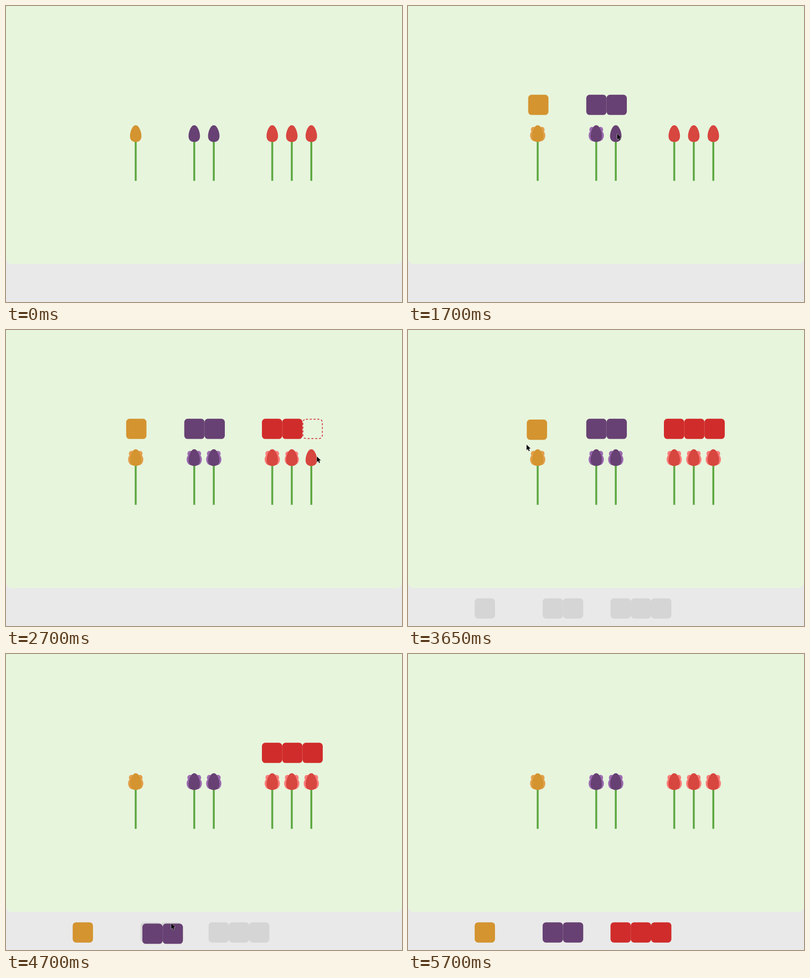
Recreate the animation shown at these times as an HTML page. Size 865 px wide and 648 px high, loop 5.75 s.

```html
<!DOCTYPE html>
<html lang="en">
<head>
<meta charset="utf-8">
<title>Tulips</title>
<style>
html, body { margin: 0; width: 100%; height: 100%; overflow: hidden; background: #e9e9e9; }
svg { display: block; width: 865px; height: 648px; }
</style>
</head>
<body>
<svg id="stage" viewBox="0 0 865 648"></svg>
<script>
const LOOP = 5750, STEP = 50, SIZE = 44.3, LAG = 85, ROW_Y = 194.3, TRAY_Y = 587.4;
const stage = document.getElementById('stage');

function add(parent, tag, attrs) {
  const node = document.createElementNS('http://www.w3.org/2000/svg', tag);
  for (const key in attrs) node.setAttribute(key, attrs[key]);
  return parent.appendChild(node);
}
const show = (node, on) => node.setAttribute('visibility', on ? 'visible' : 'hidden');
const clamp = (v, lo = 0, hi = 1) => Math.min(hi, Math.max(lo, v));
const progress = (t, start, length) => clamp((t - start) / length);
const easeOut = p => 1 - (1 - p) ** 4;
const elastic = p => p <= 0 ? 0 : p >= 1 ? 1
  : 1 + 2 ** (-10 * p) * Math.sin((p - 0.075) * 2 * Math.PI / 0.3);

const groups = [
  { x: 262.5, trayX: 145.7, flowerX: 283.3, color: '#d49430', egg: '#d49430', petal: '#e3a14e',
    clicks: [522], from: 0, grab: 3500, drop: 4010 },
  { x: 389.4, trayX: 294.1, flowerX: 411.2, color: '#674173', egg: '#674173', petal: '#9b6bb0',
    clicks: [1175, 1700], from: 0.55, grab: 4270, drop: 4620 },
  { x: 559, trayX: 442.4, flowerX: 581.6, color: '#d02c2b', egg: '#d7463f', petal: '#f97d7a',
    clicks: [2225, 2500, 2760], from: 0.55, grab: 4910, drop: 5200 }
];

// Pointer way points: time, x, y
const route = [
  [50, 206, 605], [250, 255, 470], [470, 288, 284], [530, 288, 284],
  [700, 396, 273], [800, 414, 281], [1450, 414, 281], [1680, 457, 280],
  [1780, 457, 280], [2100, 588, 281], [2250, 588, 281], [2460, 630, 280],
  [2520, 630, 280], [2700, 679, 277], [2760, 672, 280], [2860, 672, 280],
  [3130, 470, 240], [3400, 284, 214], [3530, 284, 214], [3650, 259, 251],
  [3800, 205, 430], [3960, 165.5, 610.5], [4030, 165.5, 610.5], [4240, 434, 214],
  [4290, 434, 214], [4450, 388, 415], [4600, 342.5, 610], [4640, 342.5, 610],
  [4700, 361, 590], [4860, 699, 181], [4910, 660, 212], [4940, 660, 212],
  [5170, 546, 611], [5230, 546, 611], [5450, 505, 630], [5700, 470, 655]
];

function slope(i, axis) {
  const a = route[i - 1], b = route[i], c = route[i + 1];
  if (!a || !c) return 0;
  const before = b[axis] - a[axis], after = c[axis] - b[axis];
  return before * after <= 0 ? 0 : (before + after) / (c[0] - a[0]);
}

function pointer(t) {
  let i = 0;
  while (i < route.length - 2 && t > route[i + 1][0]) i++;
  const a = route[i], b = route[i + 1], span = b[0] - a[0];
  const u = clamp((t - a[0]) / span), v = 1 - u;
  return [1, 2].map(axis =>
    a[axis] * v * v * (1 + 2 * u) + b[axis] * u * u * (3 - 2 * u) +
    span * u * v * (slope(i, axis) * v - slope(i + 1, axis) * u));
}

function buildFlower(group, i) {
  const node = add(stage, 'g', { transform: `translate(${group.flowerX + 42.65 * i} 0)` });
  add(node, 'rect', { x: -2.1, y: 290, width: 4.2, height: 92.7, fill: '#5ea843' });
  const petals = add(node, 'g', { fill: group.petal });
  for (const side of [-1, 1]) {
    add(petals, 'ellipse', { cx: 9 * side, cy: 270.8, rx: 6, ry: 6.4 });
    add(petals, 'ellipse', { cx: 7 * side, cy: 283.5, rx: 9.7, ry: 12.5 });
  }
  add(node, 'path', { fill: group.egg,
    d: 'M0 261C7 261 12.5 275 12.5 285C12.5 293 8 297.6 0 297.6S-12.5 293-12.5 285C-12.5 275-7 261 0 261Z' });
  return petals;
}

function block(parent, i, fill) {
  return add(parent, 'rect', { x: i * SIZE, y: 0, width: SIZE, height: SIZE, rx: 7.5, fill });
}

add(stage, 'rect', { width: 865, height: 648, fill: '#e9e9e9' });
add(stage, 'rect', { y: -20, width: 865, height: 585, rx: 13, fill: '#e7f5dd' });
for (const group of groups) group.petals = group.clicks.map((_, i) => buildFlower(group, i));

const tray = add(stage, 'g', {});
for (const group of groups) {
  const slot = add(tray, 'g', { transform: `translate(${group.trayX} ${TRAY_Y})` });
  group.clicks.forEach((_, i) => block(slot, i, '#d5d5d5'));
}
for (const group of groups) {
  group.node = add(stage, 'g', {});
  group.cells = group.clicks.map((_, i) => ({
    full: block(group.node, i, group.color),
    empty: add(group.node, 'rect', { x: i * SIZE + 1, y: 1, width: SIZE - 2, height: SIZE - 2, rx: 6.5,
      fill: 'none', stroke: group.color, 'stroke-width': 1.7, 'stroke-dasharray': '4.5 3.8' })
  }));
}
const cursor = add(stage, 'path', { d: 'M0 0V12.2L2.8 9.6 4.8 14.2 6.9 13.3 4.9 8.8 8.8 8.6Z',
  fill: '#000', stroke: '#fff', 'stroke-width': 1, 'paint-order': 'stroke' });

// The dragged blocks trail the pointer, then settle into their tray slot.
function blockPlace(group, t) {
  const start = pointer(group.grab);
  const now = pointer(clamp(t - LAG, group.grab, group.drop));
  const snap = easeOut(progress(t, group.drop + LAG, 120));
  const x = group.x + now[0] - start[0], y = ROW_Y + now[1] - start[1];
  return [x + (group.trayX - x) * snap, y + (TRAY_Y - y) * snap];
}

function render(t) {
  for (const group of groups) {
    const count = group.clicks.length, half = count * SIZE / 2, born = group.clicks[0];
    const grown = elastic(progress(t, born, 500));
    const scale = group.from + (1 - group.from) * grown;
    const [x, y] = blockPlace(group, t);
    group.node.setAttribute('transform',
      `translate(${x + half} ${y + SIZE / 2}) scale(${scale}) translate(${-half} ${-SIZE / 2})`);
    group.clicks.forEach((click, i) => {
      show(group.cells[i].full, t >= click);
      show(group.cells[i].empty, t >= born && t < click);
      const open = easeOut(progress(t, click + (i ? 30 : 0), 350));
      group.petals[i].setAttribute('transform',
        `translate(0 282) scale(${open}) translate(0 -282)`);
    });
  }
  tray.setAttribute('opacity', progress(t, 2980, 300));
  show(cursor, t >= 50 && t < 5700);
  cursor.setAttribute('transform', `translate(${pointer(t).join(' ')})`);
}

const origin = performance.now();
function tick() {
  const t = (performance.now() - origin) % LOOP;
  render(Math.floor(t / STEP) * STEP);
  requestAnimationFrame(tick);
}
tick();
</script>
</body>
</html>
```
